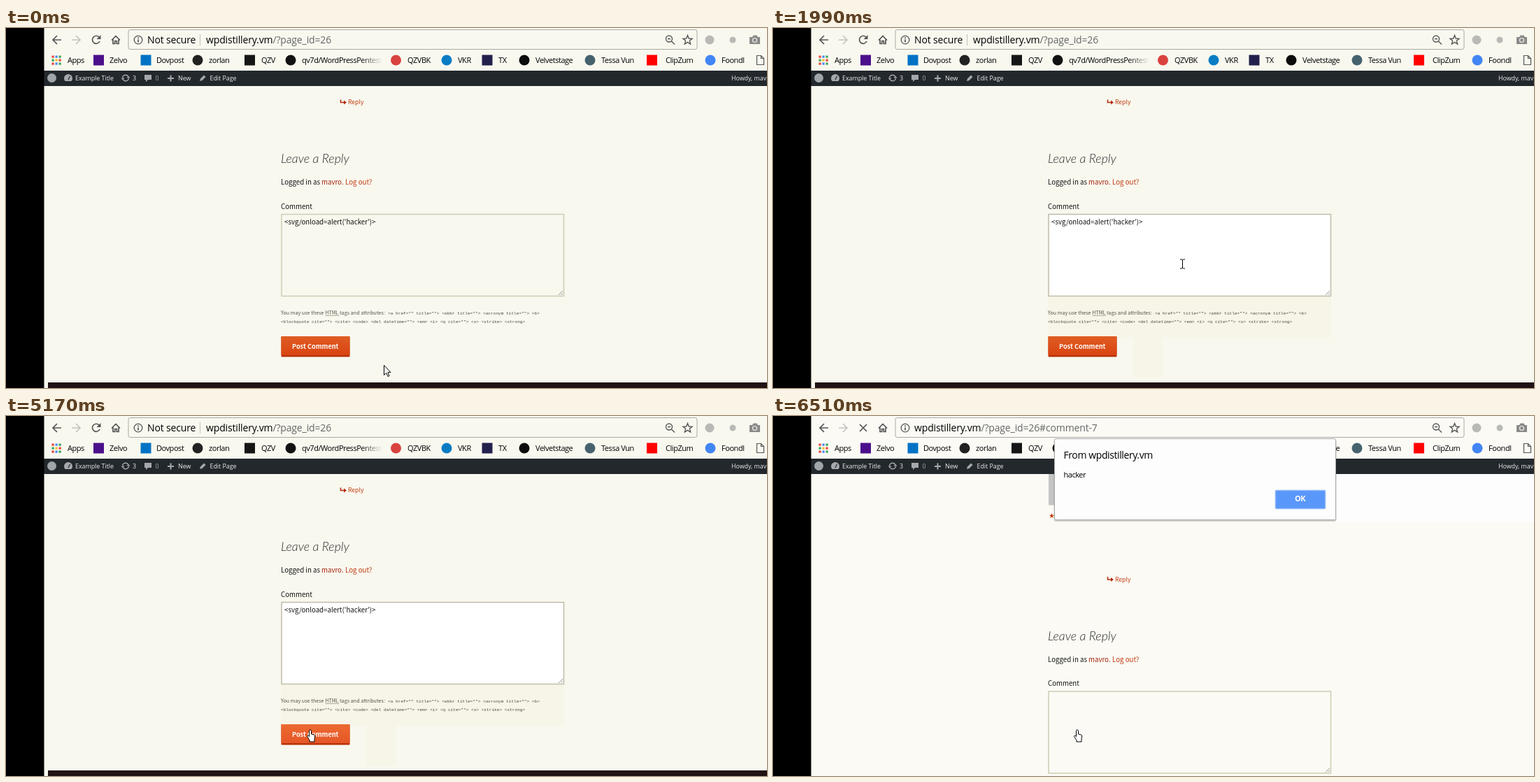
An HTML page for the animation above (8000 ms loop, 1088 by 515 pixels).

```html
<!DOCTYPE html>
<html lang="en">
<meta charset="utf-8">
<title>Comment form</title>
<style>
  html, body { margin: 0; width: 100%; height: 100%; overflow: hidden; background: #000 }
  svg { display: block; --bg: #f8f8ef }
  svg.reloaded { --bg: #fbfaf5 }
  .bg { fill: var(--bg) }
  .patch { fill: #f7f5e7 }
  .ui { font: 11px "Open Sans", "Noto Sans", sans-serif; letter-spacing: -.45px; fill: #000 }
  .url { font-size: 14px; letter-spacing: -.15px }
  .bar { font: 8.85px "Open Sans", "Noto Sans", sans-serif; fill: #eee }
  .page { font: 9.7px "Noto Sans CJK JP", "Noto Sans CJK SC", "Open Sans", sans-serif; fill: #141412 }
  .heading { font: italic 300 17.8px Lato, sans-serif; fill: #2c2c28 }
  .note { font-size: 7.2px; fill: #55544a }
  .code { font: 6.13px "Liberation Mono", monospace; fill: #4c4b42 }
  .link { fill: #c0390f }
  .line { fill: none; stroke: #555; stroke-width: 1.7 }
  .thin { fill: none; stroke: #a5a9ad; stroke-width: 1.4 }
</style>
<svg width="1088" height="515" viewBox="0 0 1088 515">
  <defs>
    <linearGradient id="fade"><stop stop-color="#f8f8ef" stop-opacity="0"/><stop offset="1" stop-color="#f8f8ef"/></linearGradient>
    <linearGradient id="btn" x2="0" y2="1"><stop stop-color="#e05d22"/><stop offset="1" stop-color="#d94412"/></linearGradient>
    <linearGradient id="hover" x2="0" y2="1"><stop stop-color="#ed6a31"/><stop offset="1" stop-color="#e55627"/></linearGradient>
  </defs>
  <rect class="bg" x="54" width="1034" height="515"/>

  <!-- faint repaint areas -->
  <path class="patch" data-on="410 6370" d="M515 443h42v57h-42z"/>
  <path class="patch" data-on="560 6370" d="M393 385h405v58H393z"/>
  <g data-on="5720 6370">
    <path class="patch" d="M122 139h370v332H122zM492 443h306v28H492z"/>
    <path fill="#fdfdfd" d="M122 83h370v56H122z"/>
  </g>
  <path data-on="6510 8000" fill="#fdfdfd" d="M804 83h284v69H804z"/>

  <g id="page" class="page">
    <path fill="#c4c4c4" d="M394-60h36V0h-36z"/>
    <text class="link" x="394.5" y="17" font-size="8">★</text>
    <path d="M478.500 102.500v4h6" fill="none" stroke="#b5280c" stroke-width="1.600"/>
    <path d="M483 103.500l4 3-4 3z" fill="#b5280c"/>
    <text class="link" x="489" y="109" font-size="8.600">Reply</text>
    <text class="heading" x="393" y="193">Leave a Reply</text>
    <text x="393" y="224">Logged in as</text>
    <text x="451" y="224" fill="#a3230c" font-weight="500">mavro.</text>
    <text class="link" x="485" y="224">Log out?</text>
    <text x="393" y="258.500">Comment</text>
    <rect id="box" x="394" y="266.500" width="403.500" height="117" stroke-width="1.500"/>
    <path d="M790 382l6-6M793.500 382l2.500-2.500" stroke="#888" stroke-width=".9"/>
    <g data-on="0 6370">
      <text x="398" y="281">&lt;svg/onload=alert('hacker')&gt;</text>
      <path id="caret" d="M516.500 270v14" stroke="#000"/>
      <text class="note" x="393" y="409.800">You may use these HTML tags and attributes:</text>
      <path d="M457 411.500h19" stroke="#686758" stroke-dasharray="1 1"/>
      <text class="code" x="546" y="409.500">&lt;a href="" title=""&gt; &lt;abbr title=""&gt; &lt;acronym title=""&gt; &lt;b&gt;</text>
      <text class="code" x="393" y="421.500">&lt;blockquote cite=""&gt; &lt;cite&gt; &lt;code&gt; &lt;del datetime=""&gt; &lt;em&gt; &lt;i&gt; &lt;q cite=""&gt; &lt;s&gt; &lt;strike&gt; &lt;strong&gt;</text>
      <rect x="393.500" y="441" width="98" height="29.500" rx="1" fill="#b93207"/>
      <rect id="button" x="393.500" y="441" width="98" height="27" rx="1"/>
      <text x="409" y="459" font-size="9.200" font-weight="700" fill="#fff">Post Comment</text>
      <path d="M60 507h1028v8H60z" fill="#211313"/>
    </g>
  </g>

  <!-- browser toolbar -->
  <path class="bg" d="M54 0h1034v61H54z"/>
  <path data-on="5720 6370" fill="#fdfdfd" d="M122 10h370v20H122z"/>
  <rect x="175" y="2.500" width="813" height="28" rx="2.500" fill="none" stroke="#aaa9a3"/>
  <path class="line" d="M79 17H67.500M73 11l-6 6 6 6"/>
  <path class="line" style="stroke:#c4c4c0" d="M94 17h11.500M100 11l6 6-6 6"/>
  <g data-on="0 5720">
    <path class="line" d="M133 13a5.500 5.500 0 1 0 1 6"/>
    <path d="M135.500 10v6h-6z" fill="#555"/>
  </g>
  <path class="line" data-on="5720 8000" d="M124 12l10 10M134 12l-10 10"/>
  <path class="line" d="M151 17.500l6-6 6 6M153 16.500v6h2.700v-4h2.600v4h2.700v-6"/>
  <circle class="line" cx="189" cy="17" r="5.800" style="stroke-width:1.300"/>
  <path class="line" d="M189 13.300v1.600M189 16.200v4.300"/>
  <g class="ui url">
    <g data-on="0 6370">
      <text x="202" y="22">Not secure</text>
      <path d="M277.500 9v16" stroke="#c2c2bc"/>
      <text x="286" y="22">wpdistillery.vm<tspan fill="#666">/?page_id=26</tspan></text>
    </g>
    <text data-on="6370 8000" x="202" y="22">wpdistillery.vm<tspan fill="#666">/?page_id=26#comment-7</tspan></text>
  </g>
  <g class="line" style="stroke-width:1.400">
    <circle cx="948" cy="15.500" r="4.500"/>
    <path d="M951.500 19l4.500 4.500M946 15.500h4"/>
    <path d="M974.500 10.500l1.800 4.500 4.700.3-3.600 3 1.200 4.700-4.100-2.600-4.100 2.600 1.200-4.700-3.600-3 4.700-.3z"/>
  </g>
  <circle cx="1006" cy="17" r="6.500" fill="#b9b9b5"/>
  <circle cx="1039" cy="17" r="4.500" fill="#b9b9b5"/>
  <path d="M1063 13h4l1.500-2.500h5L1075 13h3v10h-15z" fill="#8a8a88"/>
  <circle cx="1070.500" cy="17.500" r="3" fill="#8a8a88" stroke="#eee" stroke-width="1.200"/>
  <g id="apps"></g>
  <g id="bookmarks" class="ui"></g>
  <path data-on="0 6370" d="M508 38h30v16h-30z" fill="url(#fade)"/>
  <path d="M1073.500 39.500h6l4 4v9h-10zM1079.500 39.500v4h4" fill="none" stroke="#555" stroke-width="1.200"/>

  <!-- site toolbar -->
  <path d="M54 61h1034v22H54z" fill="#23282d"/>
  <circle cx="65.500" cy="71.500" r="6.500" fill="#a0a5aa"/>
  <path d="M84.500 76a6 6 0 1 1 9 0z" fill="#a5a9ad"/>
  <path d="M89 74l2.500-5" stroke="#23282d" stroke-width="1.300"/>
  <path class="thin" d="M166.500 71a4.500 4.500 0 0 1 8-2M175.500 72a4.500 4.500 0 0 1-8 2"/>
  <path d="M172.500 71.500h5l-2.500-3zM164.500 71.500h5l-2.500 3z" fill="#a5a9ad"/>
  <path d="M198 67h10v7h-5l-3 3v-3h-2z" fill="#a5a9ad"/>
  <path class="thin" style="stroke-width:2" d="M231 72h9M235.500 67.500v9"/>
  <path d="M277 76l1-3.500 5-5 2.500 2.500-5 5z" fill="#a5a9ad"/>
  <g class="bar">
    <text x="99" y="75">Example Title</text>
    <text x="181" y="75">3</text>
    <text x="213.500" y="75" fill="#a5a9ad">0</text>
    <text x="246" y="75">New</text>
    <text x="291.500" y="75">Edit Page</text>
    <text x="1037" y="75">Howdy, mavro</text>
  </g>

  <g data-on="6510 8000">
    <rect x="401.500" y="33" width="404" height="118" rx="3" fill="#000" opacity=".18"/>
    <rect x="402.500" y="32.500" width="402" height="116" rx="2" fill="#fdfdfd" stroke="#aaa"/>
    <text class="ui url" x="415.500" y="61" style="letter-spacing:-.4px">From wpdistillery.vm</text>
    <text class="ui" x="415.500" y="88">hacker</text>
    <rect x="718.500" y="106.500" width="71" height="26" rx="1" fill="#5a97fb" stroke="#8db6f8" stroke-width="1.500"/>
    <text class="ui" x="753.500" y="122" text-anchor="middle" style="fill:#fff;font-weight:700">OK</text>
  </g>

  <path d="M0 0h54.500v515H0z"/>
  <path id="cursor" stroke="#000" stroke-linejoin="round"/>
</svg>
<script>
const $ = id => document.getElementById(id);
const LOOP = 8000, FOCUS = 560, HOVER = 2970, SUBMIT = 5720, BLUR = 5840, RELOAD = 6370;

// label, text x, icon x, icon colour, icon shape
const bookmarks = [
  ['Apps', 88], ['Zelvo', 148, 132.5, '#4b0f8c', 'square'], ['Dovpost', 215, 200, '#0072c6', 'square'],
  ['zorlan', 290, 274, '#222', 'circle'], ['QZV', 365, 348.5, '#161616', 'square'],
  ['qv7d/WordPressPentest', 423, 407, '#111', 'circle'], ['QZVBK', 574, 557.5, '#d9433f', 'circle'],
  ['VKR', 646, 630, '#0a7cc4', 'circle'], ['TX', 704, 688, '#23204d', 'square'],
  ['Velvetstage', 757, 741, '#0c0c0c', 'circle'], ['Tessa Vun', 851, 835, '#46626f', 'circle'],
  ['ClipZum', 943, 923.5, '#f00', 'square'], ['Foondl', 1023, 1007, '#4285f4', 'circle'],
];
$('bookmarks').innerHTML = bookmarks.map(([label, x, icon, color, shape]) =>
  `<text x="${x}" y="50">${label}</text>` + (icon ?
    `<rect x="${icon - 7.5}" y="38.5" width="15" height="15" rx="${shape === 'circle' ? 7.5 : 0}" fill="${color}"/>` : '')
).join('');

const dots = ['#e8453c', '#f9bb2d', '#3aa757', '#4688f1'];
$('apps').innerHTML = [...Array(9).keys()].map(i =>
  `<rect x="${65.5 + i % 3 * 5}" y="${39.5 + (i / 3 | 0) * 5}" width="3.2" height="3.2" fill="${dots[(i * 3 + (i / 3 | 0)) % 4]}"/>`
).join('');

const shapes = {
  arrow: 'M.5.5V14.500L3.700 11.500 6 16.500 8 15.600 5.800 10.700H10Z',
  beam: 'M-3.500-6.500h2.500l1 1 1-1h2.500M0-5.500v11M-3.500 6.500h2.500l1-1 1 1h2.500',
  hand: 'M-1.500 1.500a1.500 1.500 0 0 1 3 0V6l4 1q1.300.4 1.200 2L6 13v4H-1v-2.200L-4.500 9.300q.5-1.800 1.800-.9l1.200 1.200Z',
};
// the pointer is sampled in steps: time, x, y
const tracks = {
  arrow: [[0, 540, 482], [130, 523, 442], [280, 515, 428], [410, 509, 419], [560, 517, 396]],
  beam: [[680, 521, 370.5], [830, 521, 368.5], [970, 540, 362], [1100, 570, 352], [1220, 587, 347],
    [1370, 587, 349], [1490, 586, 347], [1610, 587, 346], [1750, 587, 345], [1870, 586, 340],
    [1990, 585.5, 337.5], [2120, 584, 341.5], [2270, 572, 357.5], [2420, 548, 316],
    [2550, 523, 275.5], [2700, 521, 289.5], [2850, 508, 345]],
  hand: [[2970, 430, 446], [3090, 408, 448], [3240, 414, 453], [3360, 421, 457], [3480, 427, 459],
    [3780, 430, 455], [3900, 434, 451], [4020, 435, 449]],
};
const steps = Object.entries(tracks).flatMap(([kind, list]) => list.map(([at, x, y]) => ({ kind, at, x, y })));
const blinks = [560, 970, 1490, 1990, 2550, 3090, 3630, 4170, 4580, 5170];

const svg = document.querySelector('svg');
const timed = [...document.querySelectorAll('[data-on]')].map(el => [el, ...el.dataset.on.split(' ').map(Number)]);
const show = (el, on) => { el.style.display = on ? '' : 'none'; };

function draw() {
  const t = performance.now() % LOOP;
  const reloaded = t >= RELOAD, focused = t >= FOCUS && t < BLUR;
  for (const [el, from, to] of timed) show(el, t >= from && t < to);
  svg.classList.toggle('reloaded', reloaded);
  $('page').setAttribute('transform', `translate(0 ${reloaded ? 127.5 : 0})`);
  show($('caret'), blinks.filter(b => b <= t).length % 2);
  $('box').setAttribute('fill', t < FOCUS || reloaded ? 'none' : t < SUBMIT ? '#fff' : '#fdfdfd');
  $('box').setAttribute('stroke', focused ? '#bfbca8' : '#cfccb3');
  $('button').setAttribute('fill', t < HOVER ? 'url(#btn)' : 'url(#hover)');

  const { kind, x, y } = steps.filter(s => s.at <= t).pop();
  const cursor = $('cursor');
  cursor.setAttribute('d', shapes[kind]);
  cursor.setAttribute('transform', `translate(${x} ${y})`);
  cursor.setAttribute('fill', kind === 'beam' ? 'none' : '#fff');
  requestAnimationFrame(draw);
}
draw();
</script>
</html>
```
